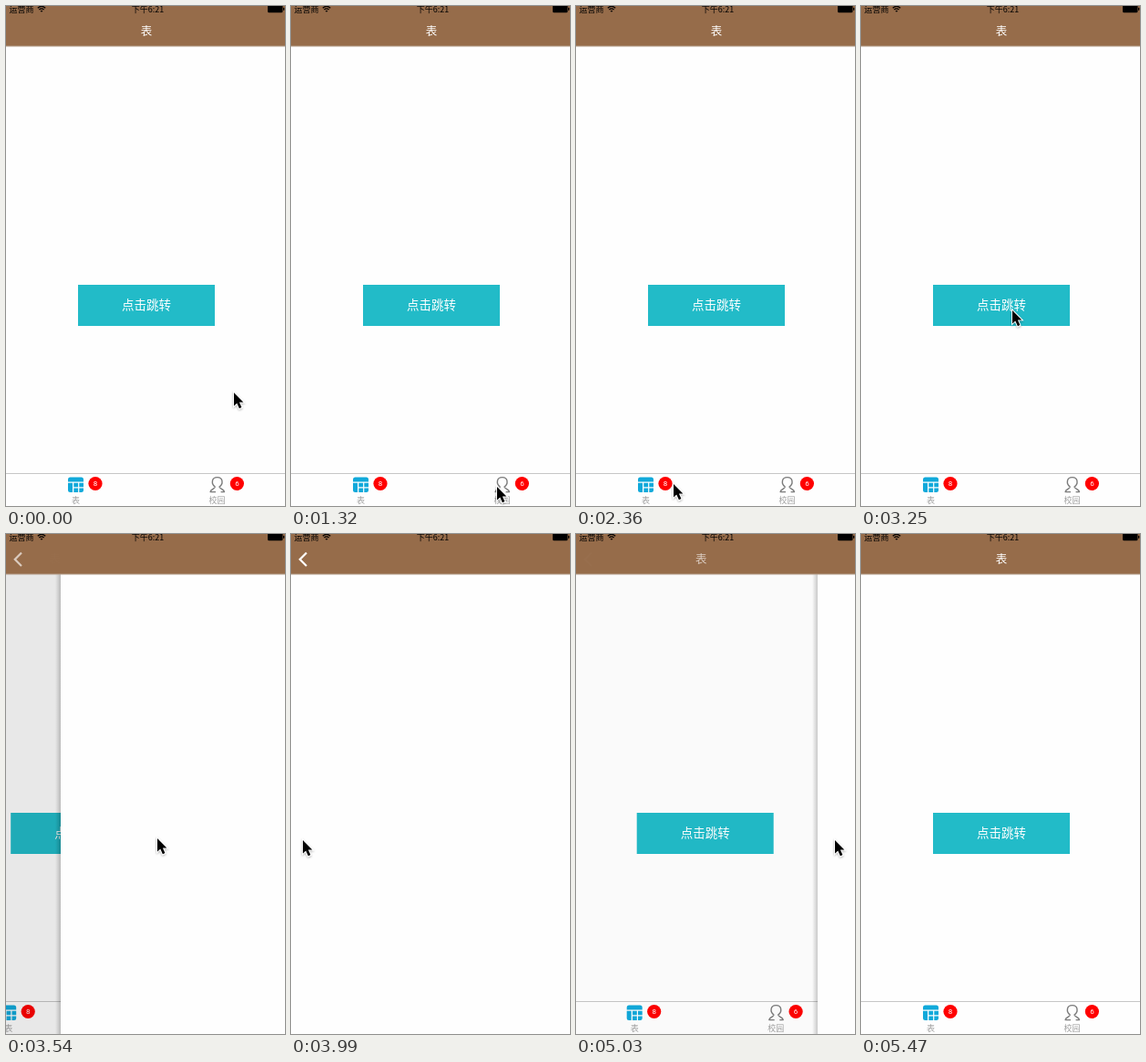
An HTML page that plays this animation: 306 px wide and 547 px high, repeating every 6510 ms.

```html
<!DOCTYPE html>
<html lang="zh-CN">
<head>
<meta charset="utf-8">
<title>导航</title>
<style>
html, body { margin: 0; width: 100%; height: 100%; overflow: hidden; background: #fefefe; }
svg { display: block; width: 100%; height: 100%; }
text { font-family: "Noto Sans CJK SC", "Noto Sans CJK", "Noto Sans", sans-serif; text-anchor: middle; }
.label { font-size: 9px; fill: #a0a0a0; }
.badge { font: 8px Roboto, "Noto Sans", sans-serif; fill: #fff; }
.title { font-size: 12.5px; fill: #fff; }
</style>
</head>
<body>
<svg viewBox="0 0 306 547">
  <defs>
    <linearGradient id="shade">
      <stop offset="0" stop-color="#000" stop-opacity="0"/>
      <stop offset="1" stop-color="#000" stop-opacity=".2"/>
    </linearGradient>
    <filter id="soft" x="-50%" y="-50%" width="200%" height="200%">
      <feDropShadow dx="0" dy="1" stdDeviation="1" flood-opacity=".35"/>
    </filter>
  </defs>

  <rect width="306" height="547" fill="#fefefe"/>
  <g id="under">
    <rect width="306" height="547" fill="#fefefe"/>
    <g id="button">
      <rect x="79" y="305" width="150" height="45" fill="#22bbc8"/>
      <text x="154" y="332.4" font-size="13.5" font-weight="300" fill="#fff">点击跳转</text>
    </g>
    <rect y="511" width="306" height="1" fill="#c6c6c6"/>
    <g id="grid">
      <path d="M68 520.5V518q0-2.5 2.5-2.5h12q2.5 0 2.5 2.5v2.5z"/>
      <path d="M68 521.7h5v10.3h-2.5q-2.5 0-2.5-2.5z"/>
      <path d="M74.3 521.7h4.8v4.5h-4.8zM80.3 521.7H85v4.5h-4.7zM74.3 527.4h4.8v4.6h-4.8zM80.3 527.4H85v2.1q0 2.5-2.5 2.5h-2.2z"/>
    </g>
    <path id="person" fill="none" stroke-width="1.4" stroke-linejoin="round"
      d="M229.4 526.1C224.8 522.6 225.3 515.6 231.7 515.6S238.6 522.6 234 526.1C234.6 528.3 239.3 528.6 239.5 531.6H235.6M229.4 526.1C228.8 528.3 224.3 528.6 224.1 531.6H230"/>
    <text class="label" x="76.5" y="543.8">表</text>
    <text class="label" x="231.5" y="543.8">校园</text>
    <circle cx="98" cy="522.5" r="7.6" fill="#f00"/>
    <text class="badge" x="98" y="525.4">8</text>
    <circle cx="253.4" cy="522.5" r="7.6" fill="#f00"/>
    <text class="badge" x="253.4" y="525.4">6</text>
  </g>
  <rect id="dim" y="44" width="306" height="503"/>
  <g id="over">
    <rect x="-6" y="44" width="6" height="503" fill="url(#shade)"/>
    <rect y="44" width="306" height="503" fill="#fefefe"/>
  </g>

  <rect width="306" height="44" fill="#966c4a"/>
  <rect y="43.5" width="306" height="1" fill="#b9a392"/>
  <text id="title" class="title" y="32.4">表</text>
  <path id="back" d="M17 20.5L9.8 27.7L17 35" fill="none" stroke="#fff" stroke-width="2.2"/>
  <text x="17" y="7.2" font-size="9">运营商</text>
  <g fill="none" stroke="#000" stroke-width="1.2">
    <path d="M34.8 2.2q4.2-3.8 8.4 0M36.4 4q2.6-2.3 5.2 0"/>
  </g>
  <path d="M37.6 5.2q1.4-1 2.8 0L39 6.7z"/>
  <text x="155.5" y="7.2" font-size="9" font-weight="500">下午6:21</text>
  <rect x="287" y="-1" width="16.5" height="8.2" rx="1.5"/>
  <rect x="304" y="1.8" width="1.3" height="3" rx=".6"/>

  <path id="pointer" d="M0 0V14.4L3.3 11.4L5.9 17.2L8.4 16.1L5.9 10.4H10.4Z"
    stroke="#fff" stroke-width="1.8" paint-order="stroke" filter="url(#soft)"/>
</svg>
<script>
const LOOP = 6510, TICK = 148, W = 306;
const $ = id => document.getElementById(id);
const [under, button, grid, person, dim, over, title, back, pointer] =
  ["under", "button", "grid", "person", "dim", "over", "title", "back", "pointer"].map($);

// Rows are [tick, ...values].
const moves = [
  [0, 250, 423], [8, 226, 526], [10, 226, 526], [15, 107, 523], [17, 107, 523],
  [22, 166, 333], [25, 166, 333], [27, 13, 335], [28, 17, 335], [29, 36, 335],
  [30, 78, 335], [31, 133, 335], [33, 246, 335], [35, 322, 335]
];
const edges = [
  [22, W], [23, 225], [24, 60], [25, 0], [28, 0], [29, 9], [30, 51], [31, 106],
  [33, 219], [34, 265], [35, 294], [36, 303], [37, W]
];
const DRAG = 27;

const linear = u => u;
const smooth = u => u * u * (3 - 2 * u);

function sample(rows, n, ease) {
  const i = rows.findIndex(r => r[0] > n);
  if (i === 0) return rows[0].slice(1);
  if (i < 0) return rows[rows.length - 1].slice(1);
  const a = rows[i - 1], b = rows[i];
  const u = ease((n - a[0]) / (b[0] - a[0]));
  return a.slice(1).map((v, k) => v + (b[k + 1] - v) * u);
}

function draw(t) {
  const n = Math.floor((t + 13) / TICK);
  const [x, y] = sample(moves, n, n < DRAG ? smooth : linear);
  const [edge] = sample(edges, n, linear);
  const p = edge / W, campus = n >= 10 && n < 16;

  pointer.setAttribute("transform", `translate(${x} ${y})`);
  under.setAttribute("transform", `translate(${-0.3 * W * (1 - p)})`);
  over.setAttribute("transform", `translate(${edge})`);
  over.style.display = p < 1 ? "" : "none";
  dim.setAttribute("opacity", 0.105 * (1 - p));

  button.style.display = campus ? "none" : "";
  grid.setAttribute("fill", campus ? "#828282" : "#10a9da");
  person.setAttribute("stroke", campus ? "#10a9da" : "#7c7c7c");

  title.textContent = campus ? "校园" : "表";
  title.setAttribute("x", 154 - 125 * (1 - p));
  title.setAttribute("opacity", p ** 3);
  back.setAttribute("opacity", (1 - p) ** 2);
}

const start = performance.now();
function frame() {
  draw((performance.now() - start) % LOOP);
  requestAnimationFrame(frame);
}
frame();
</script>
</body>
</html>
```
